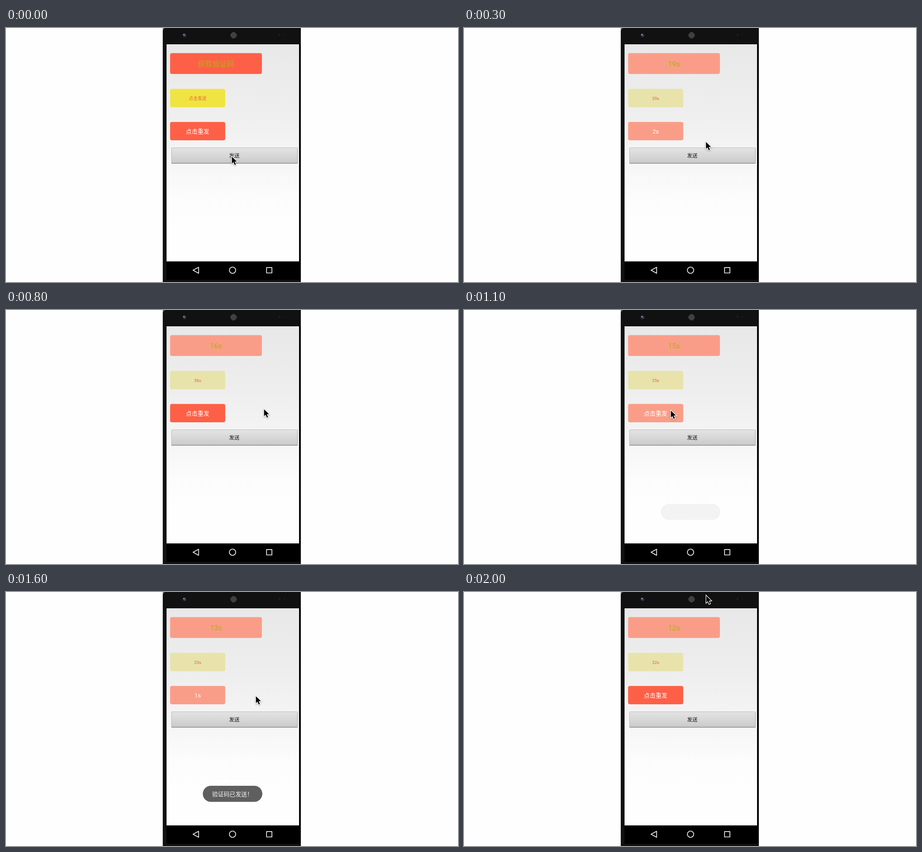
Animation of 998 by 561 pixels, one loop 2.1 s. Source, as an HTML page with a canvas:

```html
<!DOCTYPE html>
<html lang="zh-CN">
<head>
<meta charset="utf-8">
<title>验证码倒计时</title>
<style>
html, body { margin: 0; width: 100%; height: 100%; overflow: hidden; background: #fefefe; }
canvas { display: block; width: 998px; height: 561px; }
</style>
</head>
<body>
<canvas id="stage"></canvas>
<script>
const W = 998, H = 561, LOOP = 2100, STEP = 100;
const canvas = document.getElementById('stage');
const dpr = window.devicePixelRatio || 1;
canvas.width = W * dpr;
canvas.height = H * dpr;
const ctx = canvas.getContext('2d');
ctx.scale(dpr, dpr);

const FONT = 'Roboto, "Noto Sans CJK SC", "Noto Sans CJK", sans-serif';
const RED = { on: '#fd6047', off: '#fa9d88' };
const YELLOW = { on: '#f0e442', off: '#e8e3ab' };

// One displayed second lasts 2.45 steps
const SECOND = 2.45, FIRST_TAP = 0.6, SECOND_TAP = 11.3;

// Pointer keys: [step, x, y], linear in between
const POINTER = [
  [0, 498, 283], [2, 498, 283], [4, 569, 218], [9, 569, 218],
  [10, 456, 221], [12, 456, 221], [14, 551, 229], [19, 551, 229], [20, 534, 7]
];

function rect(x, y, w, h, fill) {
  ctx.fillStyle = fill;
  ctx.fillRect(x, y, w, h);
}

function pill(x, y, w, h, r, fill) {
  ctx.beginPath();
  ctx.roundRect(x, y, w, h, r);
  ctx.fillStyle = fill;
  ctx.fill();
}

function disc(x, y, r, fill) {
  ctx.beginPath();
  ctx.arc(x, y, r, 0, Math.PI * 2);
  ctx.fillStyle = fill;
  ctx.fill();
}

function label(str, x, y, size, color, alpha = 1) {
  ctx.globalAlpha = alpha;
  ctx.font = `${size}px ${FONT}`;
  ctx.textAlign = 'center';
  ctx.textBaseline = 'alphabetic';
  ctx.fillStyle = color;
  ctx.fillText(str, x, y);
  ctx.globalAlpha = 1;
}

function vertical(y0, y1, stops) {
  const g = ctx.createLinearGradient(0, y0, 0, y1);
  stops.forEach(([p, c]) => g.addColorStop(p, c));
  return g;
}

function drawPhone() {
  rect(346, 0, 305, H, '#111');
  rect(346, 0, 1, H, '#2b2b2b');
  rect(647, 36, 4, 520, '#060606');
  ctx.beginPath();
  ctx.moveTo(346, 0);
  ctx.lineTo(352, 0);
  ctx.quadraticCurveTo(347, 1, 346, 7);
  ctx.fillStyle = '#777';
  ctx.fill();

  disc(394, 16, 4.2, '#34323f');
  disc(394, 16, 2.8, '#211f38');
  disc(393, 14.8, 1.5, '#b4b0c8');
  disc(395.2, 17.2, 1.2, '#5b5688');

  disc(502.5, 16, 7, '#242424');
  for (let j = -3; j <= 3; j++)
    for (let i = -3; i <= 3; i++)
      if (i * i + j * j < 11) disc(502.5 + i * 2, 16 + j * 2, 0.65, '#777');

  disc(604, 15, 2.2, '#1f1f1f');
  disc(614.5, 15, 1.6, '#1d1d1d');

  rect(354.5, 36, 292.5, 480, vertical(36, 516, [
    [0, '#e8e8e8'], [0.3, '#eeeeee'], [0.55, '#f6f6f6'], [0.7, '#fcfcfc'], [0.82, '#fefefe'], [1, '#fefefe']
  ]));
  rect(354.5, 515.5, 292.5, 40.5, '#000');

  ctx.strokeStyle = '#f2f2f2';
  ctx.lineWidth = 1.7;
  ctx.lineJoin = 'round';
  ctx.beginPath();
  ctx.moveTo(413, 535);
  ctx.lineTo(425.3, 528.4);
  ctx.lineTo(425.3, 541.8);
  ctx.closePath();
  ctx.stroke();
  ctx.beginPath();
  ctx.arc(500.2, 535, 7, 0, Math.PI * 2);
  ctx.stroke();
  ctx.strokeRect(575.3, 529.2, 11.8, 11.8);
}

function drawSend() {
  pill(365, 264.5, 279, 35, 1.5, '#8e8e8e');
  pill(365, 264.5, 278.5, 33.5, 1.5, '#b9b9b9');
  rect(366, 265, 277, 32.5, vertical(265, 297, [[0, '#e3e3e3'], [0.5, '#d8d8d8'], [1, '#cbcbcb']]));
  label('发送', 504, 286.4, 11.6, '#111');
}

function drawCode(x, y, w, h, skin, active, str, textY, size, color, ghost) {
  pill(x, y, w, h, 4, active ? skin.off : skin.on);
  label(str, x + w / 2, textY, size, color);
  if (ghost) label(ghost, x + w / 2, textY, size, color, 0.6);
}

function drawPointer(x, y) {
  ctx.save();
  ctx.translate(x, y);
  ctx.beginPath();
  [[0.8, 1.2], [0.8, 16.6], [4.3, 13.3], [7, 19.6], [9.6, 18.5], [6.9, 12.3], [11.8, 12.1]]
    .forEach(([px, py]) => ctx.lineTo(px, py));
  ctx.closePath();
  ctx.lineJoin = 'miter';
  ctx.lineWidth = 2.4;
  ctx.strokeStyle = '#fff';
  ctx.shadowColor = 'rgba(0,0,0,.35)';
  ctx.shadowBlur = 3 * dpr;
  ctx.shadowOffsetY = 1.2 * dpr;
  ctx.stroke();
  ctx.shadowColor = 'transparent';
  ctx.fillStyle = '#000';
  ctx.fill();
  ctx.restore();
}

function pointerAt(n) {
  const k = Math.max(1, POINTER.findIndex(p => p[0] >= n));
  const [a, ax, ay] = POINTER[k - 1], [b, bx, by] = POINTER[k];
  const u = (n - a) / (b - a);
  return [ax + (bx - ax) * u, ay + (by - ay) * u];
}

const elapsed = (n, start) => Math.floor((n - start) / SECOND);

// Three-second timer: shows 2s, then 1s until it ends
function resendText(n) {
  const e = elapsed(n, n < SECOND_TAP ? FIRST_TAP : SECOND_TAP);
  return e < 0 || e > 2 ? '' : e === 0 ? '2s' : '1s';
}

function drawToast(n) {
  const a = n === 11 ? 0.07 : n > 11 && n < 17 ? 1 : 0;
  if (!a) return;
  ctx.globalAlpha = a;
  pill(434.5, 428, 131.5, 35.5, 17.75, '#5f5f5f');
  label('验证码已发送！', 500, 450.9, 12.9, '#f6f6f6', a === 1 ? 1 : 0.5);
}

function draw(ms) {
  const n = Math.floor((ms % LOOP) / STEP);
  const e = elapsed(n, FIRST_TAP), running = e >= 0, mixed = n === 1;
  const long = running ? 19 - e + 's' : '', mid = running ? 39 - e + 's' : '';
  const short = resendText(n);

  rect(0, 0, W, H, '#fefefe');
  drawPhone();
  drawCode(362.3, 55.5, 202.7, 46, RED, running,
    mixed || !running ? '获取验证码' : long, 85.3, 16.2, '#b2b112', mixed && long);
  drawCode(362.3, 134.5, 121.7, 40.5, YELLOW, running,
    mixed || !running ? '点击发送' : mid, 158.6, 9.7, '#ee6038', mixed && mid);
  drawCode(362.3, 207.5, 121.7, 40.5, RED, short || n === 11,
    mixed || !short ? '点击重发' : short, 232.8, 12.9, '#fff', mixed && short);
  drawSend();
  drawToast(n);
  drawPointer(...pointerAt(n));
}

const begin = performance.now();
function tick() {
  draw(performance.now() - begin);
  requestAnimationFrame(tick);
}
tick();
</script>
</body>
</html>
```
